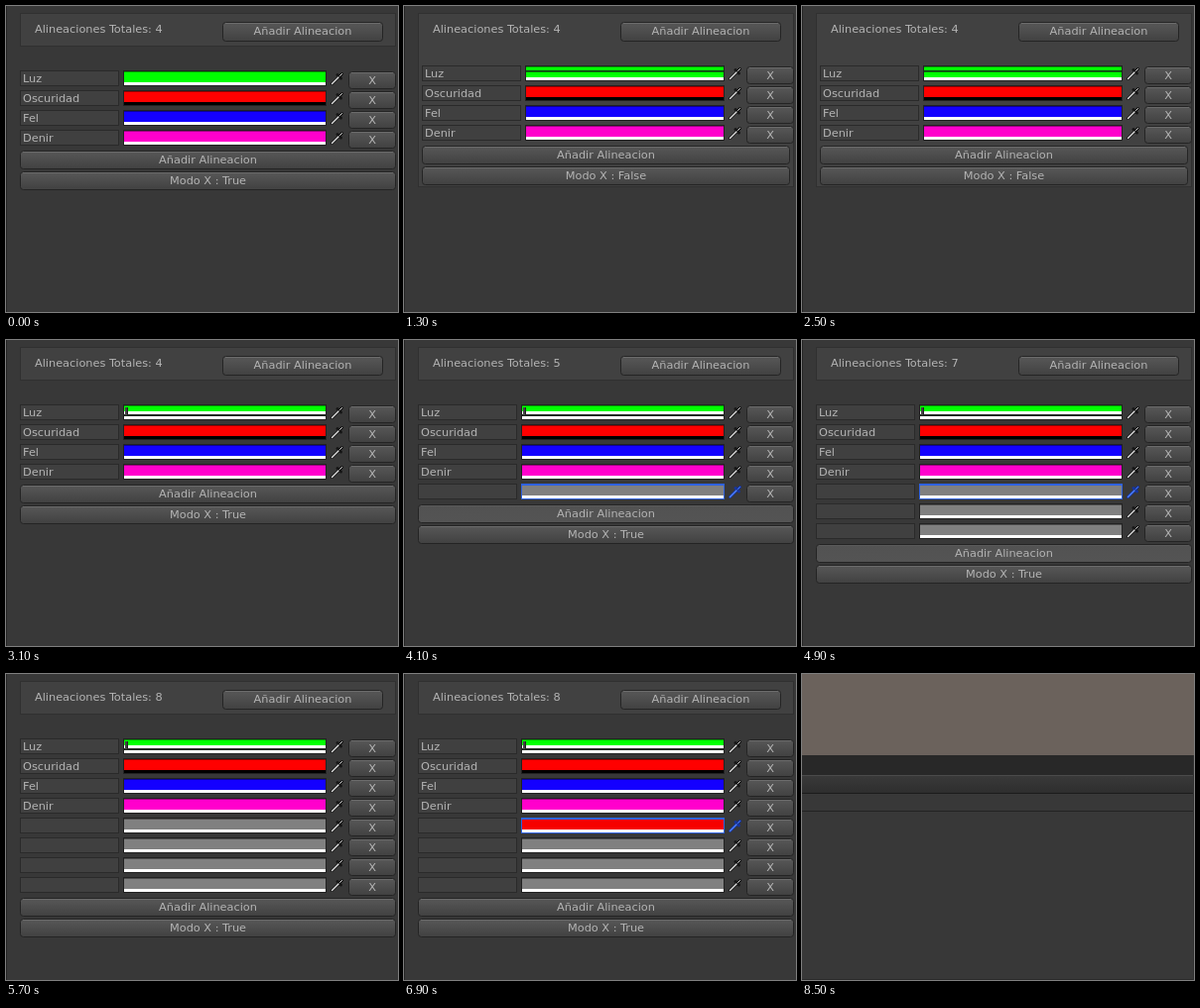
Recreate the animation shown at these times as an HTML page. Size 395x309 px, loop 8.6 s.

```html
<!DOCTYPE html>
<html lang="es">
<head>
<meta charset="utf-8">
<title>Alineaciones</title>
<style>
  html, body { margin: 0; width: 100%; height: 100%; overflow: hidden; background: #383838; }
  svg { display: block; width: 395px; height: 309px; }
  text { font: 11.3px "DejaVu Sans", sans-serif; fill: #b4b4b4; white-space: pre; }
  .mid { text-anchor: middle; }
</style>
</head>
<body>
<svg viewBox="0 0 395 309">
  <defs>
    <linearGradient id="up" x2="0" y2="1">
      <stop offset="0" stop-color="#585858"/>
      <stop offset="1" stop-color="#414141"/>
    </linearGradient>
    <linearGradient id="down" x2="0" y2="1">
      <stop offset="0" stop-color="#525252"/>
      <stop offset="1" stop-color="#545454"/>
    </linearGradient>
    <linearGradient id="bar" x2="0" y2="1">
      <stop offset="0" stop-color="#393939"/>
      <stop offset="1" stop-color="#2e2e2e"/>
    </linearGradient>
  </defs>
  <g id="view"></g>
</svg>
<script>
const LOOP = 8600;
const view = document.getElementById('view');

// Each step overrides part of the state before it.
const steps = [
  [0, { open: true, count: 4, trail: false, press: '', focus: false, fifth: '#808080', end: false }],
  [1300, { open: false, trail: true }],
  [2000, { open: true }],
  [2500, { open: false }],
  [3000, { press: 'mode' }],
  [3100, { open: true, press: '' }],
  [3400, { press: 'add' }],
  [3500, { count: 5, press: '', focus: true }],
  [4100, { press: 'add' }],
  [4200, { count: 6, press: '' }],
  [4600, { press: 'add' }],
  [4700, { count: 7, press: '' }],
  [4900, { press: 'add' }],
  [5000, { count: 8, press: '' }],
  [5700, { focus: false }],
  [6200, { fifth: '#c02424' }],
  [6300, { fifth: '#f60000' }],
  [6900, { focus: true }],
  [8500, { end: true }]
];

const items = [
  { name: 'Luz', color: '#00ff00' },
  { name: 'Oscuridad', color: '#ff0000', alpha: '#000' },
  { name: 'Fel', color: '#1400ff' },
  { name: 'Denir', color: '#ff00cc' }
];

const rect = (x, y, w, h, fill) =>
  `<rect x="${x}" y="${y}" width="${w}" height="${h}" fill="${fill}"/>`;

const frame = (x, y, w, h, fill, line) =>
  rect(x, y, w, h, line) + rect(x + 1, y + 1, w - 2, h - 2, fill);

const label = (x, y, s, cls = '') => `<text x="${x}" y="${y}" class="${cls}">${s}</text>`;

function button(x, y, w, h, s, pressed) {
  const fill = pressed ? 'down' : 'up';
  const shine = pressed ? '#5a5a5a' : '#6b6b6b';
  return `<rect x="${x + .5}" y="${y + .5}" width="${w - 1}" height="${h - 1}" rx="3" fill="url(#${fill})" stroke="#242424"/>` +
    rect(x + 3, y + 1, w - 6, 1, shine) +
    label(x + w / 2, y + 13, s, 'mid');
}

function dropper(y, focused) {
  const [edge, body] = focused ? ['#17349a', '#4f83ff'] : ['#151515', '#e2e2e2'];
  return `<g transform="translate(327 ${y})" fill="none" stroke-linecap="round">
    <path d="M1.5 12.5L8 6M7 3.5L10.5 7M8.5 5.5L11.5 2.5" stroke="${edge}" stroke-width="3"/>
    <path d="M1.5 12.5L8 6" stroke="${body}" stroke-width="1.4"/>
    <path d="M9.5 4.5L11.5 2.5" stroke="${body}" stroke-width="1"/></g>`;
}

// Leftover lines of the other layout inside the first swatch.
function trail(open) {
  if (!open) return rect(123, 65, 199, 1, '#12351a') + rect(123, 66, 199, 1, '#077a07');
  return rect(119, 72, 203, 3, '#fff') + rect(119, 75, 203, 2, '#1f2a1f') +
    rect(120, 68, 2, 8, '#414141') + rect(122, 68, 1, 8, '#222');
}

function row(i, s, dx, dy) {
  const y = 65 + i * 20 + dy;
  const item = items[i] || { name: '', color: i === 4 ? s.fifth : '#808080' };
  const focused = s.focus && i === 4;
  const x = 118 + dx, w = 205 - dx;
  return frame(14 + dx, y, 100, 16, '#404040', '#2a2a2a') +
    label(17 + dx, y + 12, item.name) +
    rect(x, y, w, 16, focused ? '#2f62e0' : '#222') +
    rect(x + 1, y + 1, w - 2, 11, item.color) +
    rect(x + 1, y + 1, w - 2, 1, focused ? '#2f62e0' : 'rgba(0,0,0,.4)') +
    rect(x + 1, y + 12, w - 2, 3, item.alpha || '#fff') +
    (i === 0 && s.trail ? trail(s.open) : '') +
    dropper(y + 1, focused) +
    button(345, y + 1, 48, 18, 'X');
}

function panel(s) {
  const dx = s.open ? 0 : 4, dy = s.open ? 0 : -5;
  const y = 66 + s.count * 20 + dy;
  const bx = s.open ? 14 : 18, bw = s.open ? 379 : 371;
  let out = rect(0, 0, 395, 309, '#383838') + rect(0, 0, 1, 309, '#242424') +
    frame(14, 7, 379, s.open ? 34 : 176, '#414141', '#303030') +
    label(29, 27, 'Alineaciones Totales: ' + s.count) +
    button(218, 16, 162, 20, 'Añadir Alineacion');
  for (let i = 0; i < s.count; i++) out += row(i, s, dx, dy);
  return out + button(bx, y, bw, 19, 'Añadir Alineacion', s.press === 'add') +
    button(bx, y + 21, bw, 19, 'Modo X : ' + (s.open ? 'True' : 'False'), s.press === 'mode');
}

function blank() {
  return rect(0, 0, 395, 309, '#383838') +
    rect(0, 0, 395, 82, '#6b625c') +
    rect(0, 82, 395, 20, '#282828') +
    rect(0, 102, 395, 1, '#4a4a4a') +
    rect(0, 103, 395, 17, 'url(#bar)') +
    rect(0, 120, 395, 1, '#1c1c1c') +
    rect(0, 138, 395, 1, '#222') +
    rect(0, 308, 395, 1, '#2b2b2b') +
    rect(394, 82, 1, 227, '#303030');
}

let shown = -1;
function draw(now) {
  const t = now % LOOP;
  const past = steps.filter(([at]) => at <= t);
  if (past.length !== shown) {
    shown = past.length;
    const s = Object.assign({}, ...past.map(p => p[1]));
    view.innerHTML = s.end ? blank() : panel(s);
  }
}

const start = performance.now();
function tick() {
  draw(performance.now() - start);
  requestAnimationFrame(tick);
}
tick();
</script>
</body>
</html>
```
